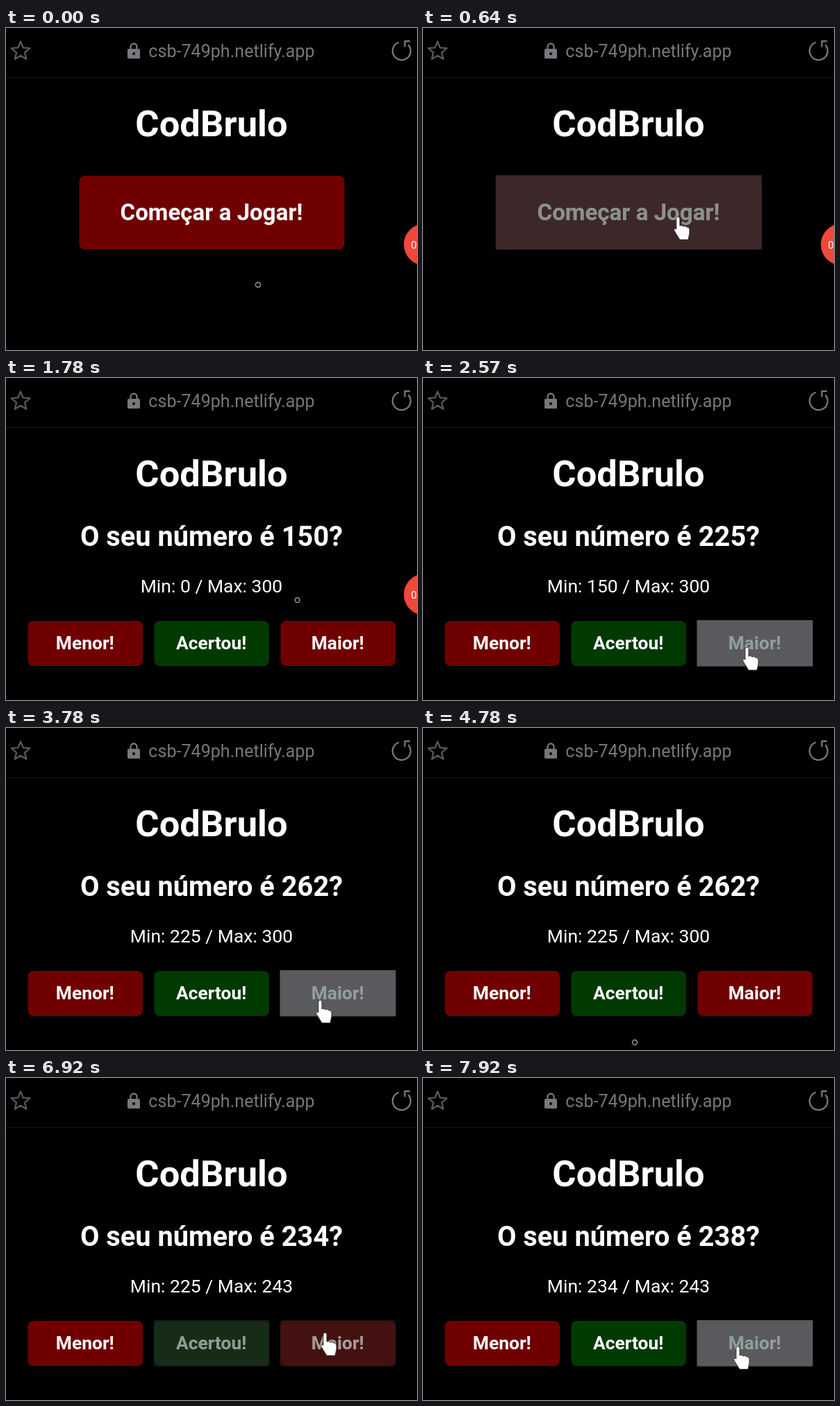
Recreate the animation shown at these times as an HTML page. Size 592 px wide and 464 px high, loop 7990 ms.

```html
<!DOCTYPE html>
<html lang="pt">
<head>
<meta charset="utf-8">
<title>Adivinhe o número</title>
<style>
  html, body { margin: 0; width: 100%; height: 100%; overflow: hidden; background: #000; }
  svg { display: block; width: 592px; height: 464px; }
  text { font-family: Roboto, sans-serif; text-anchor: middle; fill: #fff; }
  .bold { font-weight: 700; }
  .bar { color: #77777c; }
  .line { fill: none; stroke: currentColor; stroke-width: 2.3; stroke-linecap: round; stroke-linejoin: round; }
  .solid { fill: currentColor; }
  #recorder { animation: leave 7990ms linear infinite; }
  @keyframes leave {
    0%, 24% { transform: none; }
    28%, 100% { transform: translateX(40px); }
  }
</style>
</head>
<body>
<svg viewBox="0 0 592 464">
  <rect width="592" height="464"/>

  <g class="bar">
    <path id="star" class="line" opacity=".75"/>
    <rect class="solid" x="175" y="30" width="18" height="14" rx="1.5"/>
    <path class="line" d="M179.500 30v-3a4.500 4.500 0 0 1 9 0v3"/>
    <circle cx="184" cy="37" r="2"/>
    <text class="solid" x="325" y="42" font-size="25.1">csb-749ph.netlify.app</text>
    <path class="line" d="M565 21A13 13 0 1 0 580 25M574.500 26.500V19H581"/>
  </g>
  <path d="M0 71.500H592" stroke="#171717"/>

  <text class="bold" x="296" y="156" font-size="52.500">CodBrulo</text>

  <g id="startScreen"></g>
  <g id="gameScreen">
    <text id="guess" class="bold" x="296" y="242" font-size="39.800"></text>
    <text id="range" x="296" y="309" font-size="26.500"></text>
  </g>

  <g id="recorder">
    <circle cx="603" cy="312" r="30" fill="#f0483a"/>
    <text x="587.5" y="318" font-size="15">0</text>
  </g>

  <circle id="dot" r="3.500" fill="none" stroke="#a0a0a0" stroke-width="1.400"/>
  <path id="hand" d="M-3 2Q-.5-2 2 2V13Q5 11 7 14Q10 12 12 15Q15 14 16 18V24L14 33H2L-6 20Q-7 15-3 18Z"
        fill="#fff" stroke="#222" stroke-width=".8"/>
</svg>

<script>
const LOOP = 7990, FADE = 450, SAMPLES = 30;
const RED = '#700000', GREEN = '#003a00';
const $ = id => document.getElementById(id);
const smooth = u => u * u * (3 - 2 * u);

// The pointer eases from stop to stop: time, x, y.
const stops = [
  [0, 363, 370], [700, 368, 270], [1000, 373, 253], [2570, 467, 388], [3780, 453, 392],
  [4200, 420, 455], [5550, 130, 450], [5780, 140, 380], [6300, 142, 382], [6920, 460, 367], [LOOP, 454, 387]
];
const clicks = [750, 2400, 3560, 5750, 6250, 7400];

function add(parent, tag, attrs, text = '') {
  const el = document.createElementNS('http://www.w3.org/2000/svg', tag);
  for (const key in attrs) el.setAttribute(key, attrs[key]);
  el.textContent = text;
  return parent.appendChild(el);
}

function makeButton(screen, label, x, y, width, height, fill, size) {
  const base = add(screen, 'rect', { x, y, width, height, rx: 8, fill });
  const glow = add(screen, 'rect', { x: x - 1, y: y - 1, width: width + 1.5, height: height + 1.5, fill: '#5a5a5e' });
  const place = { x: x + width / 2 - .5, y: y + height / 2 + size * .34, 'font-size': size, class: 'bold' };
  const plain = add(screen, 'text', place, label);
  const lit = add(screen, 'text', { ...place, style: 'fill:#92a09c' }, label);
  return {
    screen,
    contains: (px, py) => px > x && px < x + width && py > y && py < y + height,
    // The colour sinks first, then the gray comes up.
    setHover(level) {
      base.setAttribute('opacity', 1 - level);
      glow.setAttribute('opacity', level * level);
      plain.setAttribute('opacity', 1 - level);
      lit.setAttribute('opacity', level);
    }
  };
}

const gameButton = (label, column, fill) =>
  makeButton($('gameScreen'), label, 31.5 + 182 * column, 350, 165.5, 65, fill, 26.4);

const start = makeButton($('startScreen'), 'Começar a Jogar!', 105.5, 213, 382, 106, RED, 33.1);
const lower = gameButton('Menor!', 0, RED);
const right = gameButton('Acertou!', 1, GREEN);
const higher = gameButton('Maior!', 2, RED);
const buttons = [start, lower, right, higher];

const starPoints = Array.from({ length: 10 }, (_, i) => {
  const r = i % 2 ? 6.3 : 14, a = (i / 5 - .5) * Math.PI;
  return `${21 + r * Math.cos(a)} ${33.5 + r * Math.sin(a)}`;
});
$('star').setAttribute('d', `M${starPoints.join('L')}Z`);

function pointerAt(t) {
  const i = stops.findIndex(stop => stop[0] > t);
  const [t0, x0, y0] = stops[i - 1], [t1, x1, y1] = stops[i];
  const k = smooth((t - t0) / (t1 - t0));
  return [x0 + (x1 - x0) * k, y0 + (y1 - y0) * k];
}

function hitAt(t) {
  const screen = t <= clicks[0] ? $('startScreen') : $('gameScreen');
  return buttons.find(b => b.screen === screen && b.contains(...pointerAt(t)));
}

// Binary search: each click narrows the range by the button under the pointer.
function rangeAt(t) {
  let min = 0, max = 300;
  for (const click of clicks.filter(c => c <= t)) {
    const middle = Math.floor((min + max) / 2), button = hitAt(click);
    if (button === higher) min = middle;
    if (button === lower) max = middle;
  }
  return [min, max];
}

// Hover level is the share of the last FADE ms spent over each button.
function drawHover(t) {
  const hits = Array.from({ length: SAMPLES }, (_, i) => hitAt(Math.max(0, t - FADE * i / SAMPLES)));
  for (const button of buttons) button.setHover(hits.filter(hit => hit === button).length / SAMPLES);
}

function draw(t) {
  const playing = t >= clicks[0], [min, max] = rangeAt(t);
  $('startScreen').style.display = playing ? 'none' : '';
  $('gameScreen').style.display = playing ? '' : 'none';
  $('guess').textContent = `O seu número é ${Math.floor((min + max) / 2)}?`;
  $('range').textContent = `Min: ${min} / Max: ${max}`;
  drawHover(t);

  const shape = hitAt(t) ? 'hand' : 'dot';
  for (const id of ['dot', 'hand']) {
    $(id).setAttribute('transform', `translate(${pointerAt(t)})`);
    $(id).style.display = id === shape ? '' : 'none';
  }
}

const began = performance.now();
function tick() {
  draw((performance.now() - began) % LOOP);
  requestAnimationFrame(tick);
}
tick();
</script>
</body>
</html>
```
